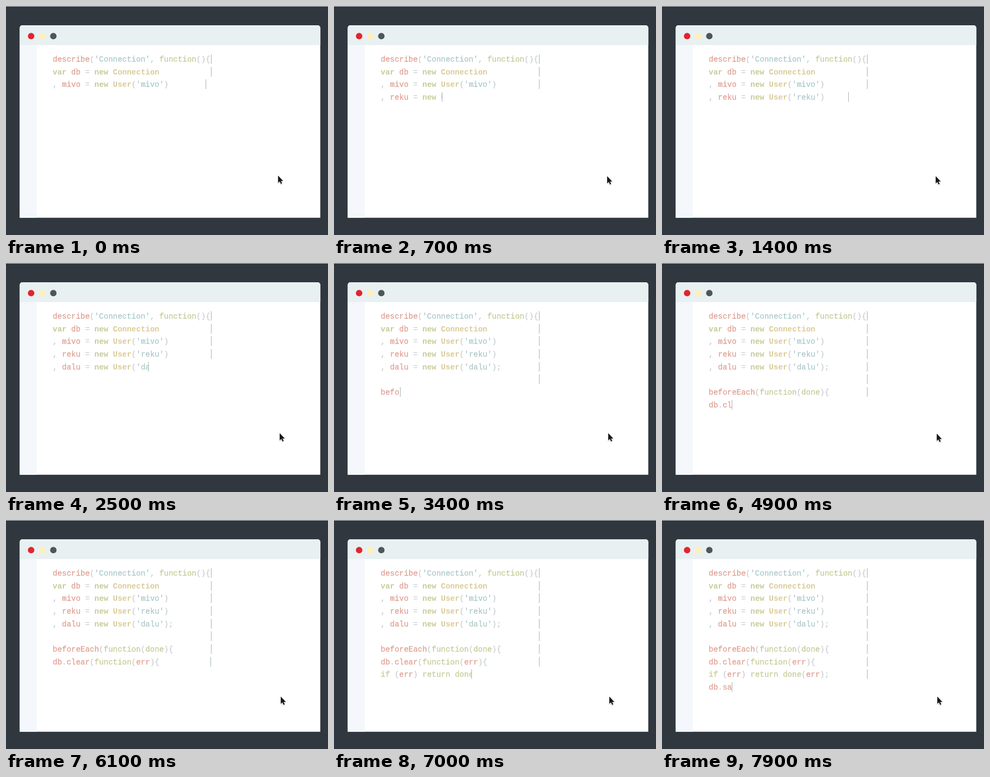
Animation of 600 by 428 pixels, one loop 8000 ms. Source, as an HTML page:

```html
<!DOCTYPE html>
<html lang="en">
<head>
<meta charset="utf-8">
<title>Typing code</title>
<style>
  html, body { margin: 0; width: 100%; height: 100%; overflow: hidden; background: #30373f; }
  #stage { position: relative; width: 600px; height: 428px; overflow: hidden; }
  #stage > * { position: absolute; }
  .window, #pointer { left: 0; top: 0; overflow: visible; }
  .line {
    left: 87px; height: 18px; margin: 0; overflow: hidden; white-space: pre;
    font: 14.4px/20px "Courier New", "Liberation Mono", monospace;
    border-right: 1px solid #a3b4b6; color: #b9c5ca;
  }
  .line span { -webkit-text-stroke: .3px currentColor; }
  .line .punct { -webkit-text-stroke: 0; }
  .string { color: #adc9ca; }
  .keyword { color: #c8cb98; }
  .type { color: #dacb98; }
  .name { color: #dfa094; }
  .line .strong { font-weight: bold; -webkit-text-stroke: 0; }
  #pointer { filter: drop-shadow(0 1px 1px rgba(0, 0, 0, .25)); }
</style>
</head>
<body>
<div id="stage">
  <svg class="window" width="600" height="428">
    <rect width="600" height="1" fill="#c3c8ca"/>
    <path d="M25.6 395.7V41a5 5 0 0 1 5-5H580.6a5 5 0 0 1 5 5V395.7Z" fill="#fff"/>
    <path d="M25.6 73V41a5 5 0 0 1 5-5H580.6a5 5 0 0 1 5 5V73Z" fill="#e8f0f2"/>
    <path d="M25.6 73H57V395.7H25.6Z" fill="#f4f8fd"/>
    <circle cx="46.8" cy="56.3" r="6" fill="#e0252f"/>
    <circle cx="67.6" cy="56.3" r="6" fill="#fdf1b8"/>
    <circle cx="88.2" cy="56.3" r="6" fill="#4d5759"/>
  </svg>
  <svg id="pointer" width="14" height="20">
    <path d="M0 0V13.5L3 10.7L5.2 15.6L7.4 14.6L5.3 9.9H9.4Z" fill="#15191d" stroke="#fff" stroke-width="1" paint-order="stroke"/>
  </svg>
</div>
<script>
const LOOP = 8000, STEP = 100;
const FULL = 295, TYPING = 1410, PITCH = 23.67;

// text, start time, duration
const LINES = [
  ["describe('Connection', function(){", -5000],
  ["var db = new Connection", -3000],
  [", mivo = new User('mivo')", -1360],
  [", reku = new User('reku')", 155],
  [", dalu = new User('dalu');", 1651],
  ["", 3080, 130],
  ["beforeEach(function(done){", 3229],
  ["db.clear(function(err){", 4694],
  ["if (err) return done(err);", 6194],
  ["db.sa", 7694]
];

// time, x, y
const PATH = [
  [0, 507, 317], [900, 510, 318], [2500, 510, 318], [4100, 511, 318],
  [4900, 512, 319], [5500, 512, 319], [6100, 512, 330], [7900, 513, 330]
];

const stage = document.getElementById("stage");
const pointer = document.getElementById("pointer");

function tokenClass(token) {
  if (token[0] === "'") return "string";
  if (/^(var|new)$/.test(token)) return "keyword strong";
  if (/^(function|done|if|return)$/.test(token)) return "keyword";
  if (/^(Connection|User)$/.test(token)) return "type strong";
  return /^\w/.test(token) ? "name" : "punct";
}

function makeLine([text, start, duration = TYPING], row) {
  const el = document.createElement("pre");
  el.className = "line";
  el.style.top = 90 + row * PITCH + "px";
  for (const token of text.match(/'.*?'|\w+|[^\w']+/g) || []) {
    const span = document.createElement("span");
    span.className = tokenClass(token);
    span.textContent = token;
    el.append(span);
  }
  stage.insertBefore(el, pointer);
  return { el, start, duration };
}

function pointAt(t) {
  const next = PATH.findIndex(p => p[0] > t);
  if (next < 0) return PATH[PATH.length - 1].slice(1);
  const a = PATH[next - 1], b = PATH[next];
  const k = (t - a[0]) / (b[0] - a[0]);
  return [1, 2].map(i => Math.round(a[i] + (b[i] - a[i]) * k));
}

const lines = LINES.map(makeLine);

function draw() {
  const t = Math.floor(performance.now() % LOOP / STEP) * STEP;
  for (const { el, start, duration } of lines) {
    const done = Math.min(1, (t - start) / duration);
    el.style.display = done < 0 ? "none" : "block";
    el.style.width = Math.max(0, done) * FULL + "px";
  }
  const [x, y] = pointAt(t);
  pointer.style.transform = `translate(${x}px, ${y}px)`;
  requestAnimationFrame(draw);
}
draw();
</script>
</body>
</html>
```
